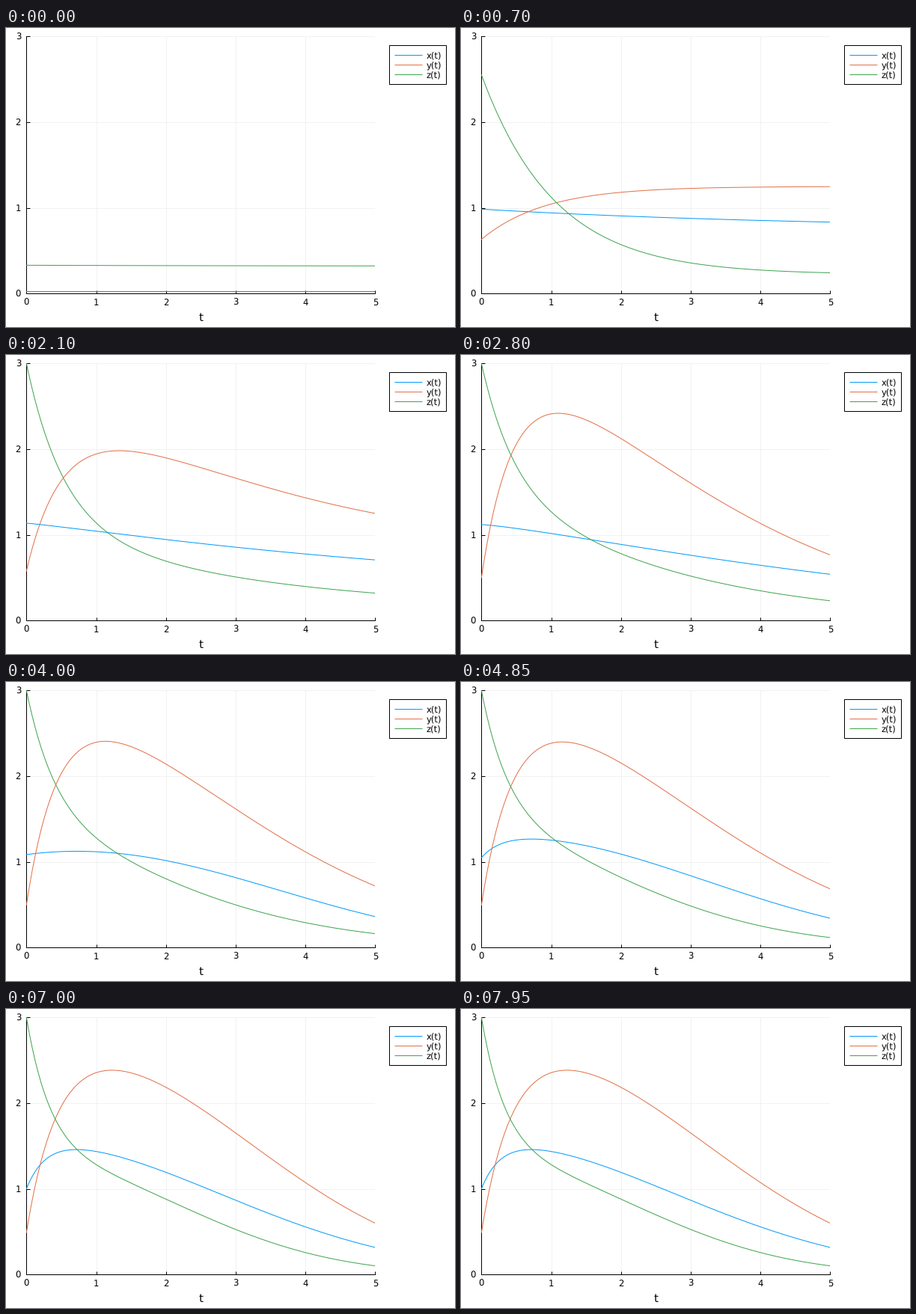
A matplotlib script for the animation above (8 s loop, 600x400 px).

```python
import numpy as np
import matplotlib.pyplot as plt
from matplotlib.animation import FuncAnimation
from matplotlib.patches import Rectangle

W, H, DPI = 600, 400, 100
FRAMES, STEP = 160, 50
PX = 72 / DPI
BLUE, ORANGE, GREEN = "#009afa", "#e36f47", "#3ea44e"
LEFT, RIGHT, TOP, BOTTOM = 27.3, 493.4, 11.4, 355.2

plt.rcParams["font.family"] = "DejaVu Sans"
plt.rcParams["text.hinting"] = "none"

t = np.linspace(0, 5, 241)


def curve(start, body, rate=1, width=np.inf, power=1):
    """Relax from start onto a body that itself fades with time."""
    return (body * np.exp(-(t / width) ** power)
            + (start - body) * np.exp(-rate * t))


# Shape of each solution at a few moments (ms) of the training
X = {
    0: curve(.025, .025),
    850: curve(1.19, .9, .2),
    1400: curve(1.153, .75, .234),
    2800: curve(1.12, 1.12, 1, 6.43, 1.25),
    4000: curve(1.085, 1.21, .85, 4.6, 2.25),
    6000: curve(1, 1.55, 3.7, 3.95, 1.97),
}
Y = {
    0: curve(-.15, -.15),
    850: curve(.8, 1.55, 1.1),
    1400: curve(.655, 1.735, 1.43),
    2800: curve(.5, 3.1, 2.12, 3.985, 1.48),
    7000: curve(.49, 2.7, 2.27, 4.15, 2.2),
}
Z = {
    0: curve(.33, .32, .3),
    850: curve(3.03, .2, .95),
    1400: curve(3, .62, 1.69, 12),
    2800: curve(3, 1.55, 2.2, 2.75, 1.08),
    4800: curve(3, 1.35, 2.5, 2.95, 1.7),
    7000: curve(3, 1.3, 2.8, 3.15, 2.03),
}


def blend(poses, ms):
    times = list(poses)
    pos = np.interp(ms, times, range(len(times)))
    i = min(int(pos), len(times) - 2)
    a, b = poses[times[i]], poses[times[i + 1]]
    return a + (b - a) * (pos - i)


fig = plt.figure(figsize=(W / DPI, H / DPI), dpi=DPI, facecolor="white")

stage = fig.add_axes([0, 0, 1, 1])
stage.set(xlim=(0, W), ylim=(H, 0))
stage.axis("off")

ax = fig.add_axes([LEFT / W, 1 - BOTTOM / H,
                   (RIGHT - LEFT) / W, (BOTTOM - TOP) / H])
ax.set(xlim=(0, 5), ylim=(0, 3), xticks=range(6), yticks=range(4))
ax.patch.set_visible(False)
ax.set_axisbelow(True)
ax.grid(color="#f1f1f1", lw=PX)
ax.spines[["top", "right"]].set_visible(False)
ax.spines[["left", "bottom"]].set_linewidth(PX)
ax.tick_params(direction="in", length=4.5 * PX, width=PX,
               labelbottom=False, labelleft=False)


def label(x, y, s, ha="center", size=8.4):
    stage.text(x, y, s, ha=ha, va="baseline", fontsize=size, color="black")


for n in range(6):
    label(LEFT + n * (RIGHT - LEFT) / 5, 371, str(n))
for n in range(4):
    label(20, BOTTOM - n * (BOTTOM - TOP) / 3 + 4.5, str(n), ha="right")
label(261, 392, "t", size=11)

stage.add_patch(Rectangle((512.3, 23.3), 75.7, 51.7,
                          fc="white", ec="black", lw=PX))

curves = []
for i, (name, color, poses) in enumerate([("x(t)", BLUE, X), ("y(t)", ORANGE, Y),
                                          ("z(t)", GREEN, Z)]):
    y = 36 + 13 * i
    stage.plot([518.5, 556], [y, y], color=color, lw=PX, solid_capstyle="butt")
    label(562, y + 4, name, ha="left")
    line, = ax.plot([], [], color=color, lw=PX, zorder=3)
    curves.append((line, poses))


def update(frame):
    for line, poses in curves:
        line.set_data(t, blend(poses, frame * STEP))
    return [line for line, _ in curves]


anim = FuncAnimation(fig, update, frames=FRAMES, interval=STEP,
                     repeat=True, repeat_delay=0, blit=False)
plt.show()
```
